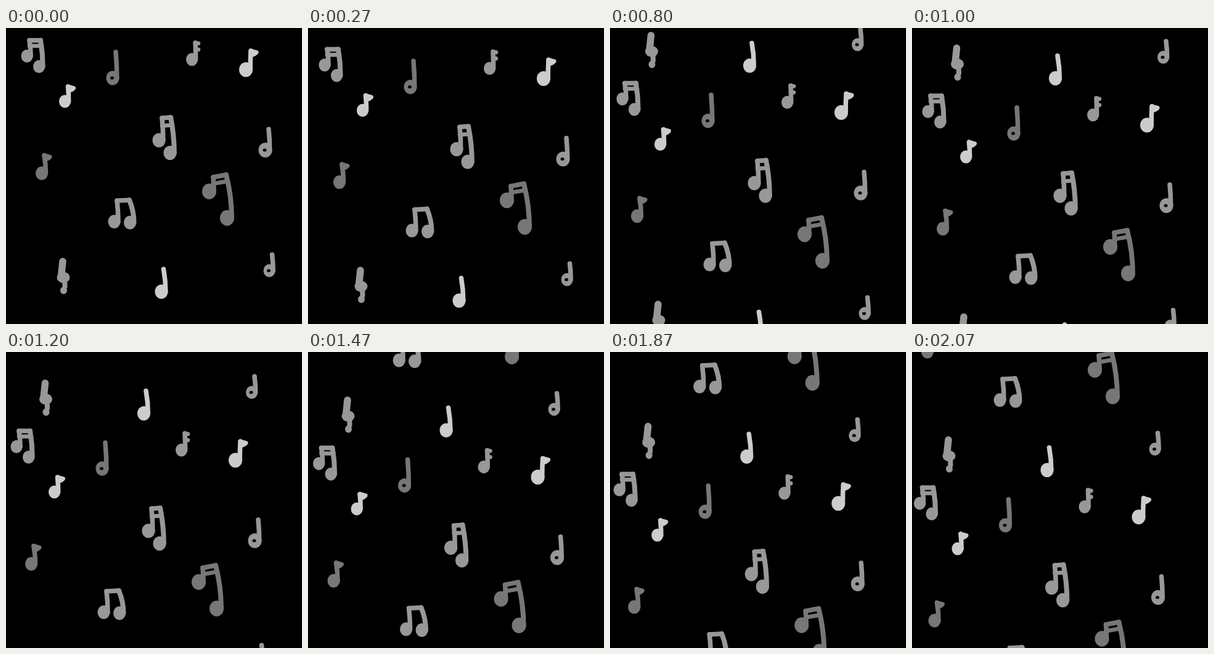
Recreate the animation shown at these times as an HTML page with a canvas. Size 480x480 px, loop 2.19 s.

```html
<!DOCTYPE html>
<html>
<head>
<meta charset="utf-8">
<style>
html, body { margin: 0; width: 100%; height: 100%; overflow: hidden; background: #000; }
canvas { display: block; width: 480px; height: 480px; }
</style>
</head>
<body>
<canvas id="stage" width="480" height="480"></canvas>
<script>
const ctx = document.getElementById('stage').getContext('2d');
const LOOP = 2190, FPS = 15;
const REPEAT = { x: 11.5, y: 436, from: 9 };  // second copy above, shown from this step on
const LIGHT = '#ccc', MID = '#989898', DARK = '#777';

// Drift of the whole sheet: key points [step, x, y], joined by straight lines
const drift = [
  [0, 0, 0], [4, -7, 14.5], [7, 2, 33], [9, -9, 51], [12, -14, 69.5],
  [15, -8, 90], [18, -17, 108], [25, -16, 156], [31, -21.5, 200]
];

function driftAt(step) {
  const i = Math.max(1, drift.findIndex(([s]) => s >= step));
  const [s0, x0, y0] = drift[i - 1], [s1, x1, y1] = drift[i];
  const p = (step - s0) / (s1 - s0);
  return [x0 + (x1 - x0) * p, y0 + (y1 - y0) * p];
}

function oval(x, y, rx, ry = rx * 1.1) {
  ctx.beginPath();
  ctx.ellipse(x, y, rx, ry, 0, 0, Math.PI * 2);
  ctx.fill();
}

function line(width, ...points) {
  ctx.lineWidth = width;
  ctx.beginPath();
  for (const [x, y] of points) ctx.lineTo(x, y);
  ctx.stroke();
}

// Head at (x, y) with a stem that bends down from (tx, ty) into its right side
function headAndStem(x, y, r, tx, ty, width = 7.5) {
  const foot = x + r * 0.65;
  oval(x, y, r);
  ctx.lineWidth = width;
  ctx.beginPath();
  ctx.moveTo(tx, ty);
  ctx.quadraticCurveTo(foot, (ty + y) / 2, foot, y);
  ctx.stroke();
}

const endings = {
  plain() {},
  hollow(x, y) {
    ctx.fillStyle = '#000';
    oval(x - 1, y, 3, 2.5);
  },
  flag(x, y, tx, ty) {
    line(7, [tx, ty], [tx + 9, ty + 2.5], [tx + 6, ty + 5], [tx + 1, ty + 7]);
  },
  twoFlags(x, y, tx, ty) {
    line(6.5, [tx, ty], [tx + 5, ty + 1]);
    line(6.5, [tx, ty + 10], [tx + 5, ty + 11]);
  }
};

function single(color, x, y, r, tx, ty, ending = 'plain') {
  ctx.fillStyle = ctx.strokeStyle = color;
  headAndStem(x, y, r, tx, ty);
  endings[ending](x, y, tx, ty);
}

// Two heads joined by a beam, with a second beam when gap is given
function pair(color, [x1, y1], [x2, y2], r, [lx, ly], [rx, ry], gap = 0) {
  ctx.fillStyle = ctx.strokeStyle = color;
  headAndStem(x1, y1, r, lx, ly);
  headAndStem(x2, y2, r, rx, ry, 8);
  line(7.5, [lx, ly], [rx, ry]);
  if (gap) line(6.5, [lx, ly + gap], [rx + 2, ry + gap]);
}

function clef(color, x, y) {
  ctx.fillStyle = ctx.strokeStyle = color;
  oval(x, y, 10.5, 9);
  line(11.5, [x - 1, y - 26], [x - 3.5, y - 2]);
  line(8, [x + 2, y], [x + 2.5, y + 15]);
  oval(x + 0.5, y + 21, 5.5);
}

function drawSheet() {
  pair(MID, [34, 45.5], [53.5, 62.5], 9.5, [38, 20], [56, 20], 9);
  pair(MID, [248, 182], [266, 202.5], 10.5, [253, 146], [267, 145], 12.5);
  pair(DARK, [329.5, 265], [358.5, 308], 11.5, [336, 242], [357, 238], 10.5);
  pair(MID, [175.5, 314], [201, 315.5], 10, [180, 280], [200, 279]);
  single(DARK, 173, 81, 10.5, 178, 39, 'hollow');
  single(MID, 420.5, 198, 11, 426, 164, 'hollow');
  single(MID, 427, 393.5, 9.5, 431.5, 367.5, 'hollow');
  single(MID, 301.5, 51, 9.5, 307, 24, 'twoFlags');
  single(LIGHT, 389, 67.5, 11, 397, 37, 'flag');
  single(LIGHT, 95.5, 119, 9.5, 100.5, 95, 'flag');
  single(DARK, 58, 235.5, 10, 62, 206.5, 'flag');
  single(LIGHT, 252, 427.5, 10.5, 255.5, 391);
  clef(MID, 93, 404.5);
}

function draw(now) {
  let step = Math.floor((now % LOOP) * FPS / 1000 + 0.1);
  if (step % 3 === 2) step--;  // every third step is held
  const [dx, dy] = driftAt(Math.min(step, 31));
  ctx.setTransform(1, 0, 0, 1, 0, 0);
  ctx.clearRect(0, 0, 480, 480);
  ctx.lineCap = ctx.lineJoin = 'round';
  ctx.translate(dx, dy);
  drawSheet();
  if (step >= REPEAT.from) {
    ctx.translate(-REPEAT.x, -REPEAT.y);
    drawSheet();
  }
}

let begin;
function tick(now) {
  begin ??= now;
  draw(now - begin);
  requestAnimationFrame(tick);
}
draw(0);
requestAnimationFrame(tick);
</script>
</body>
</html>
```
